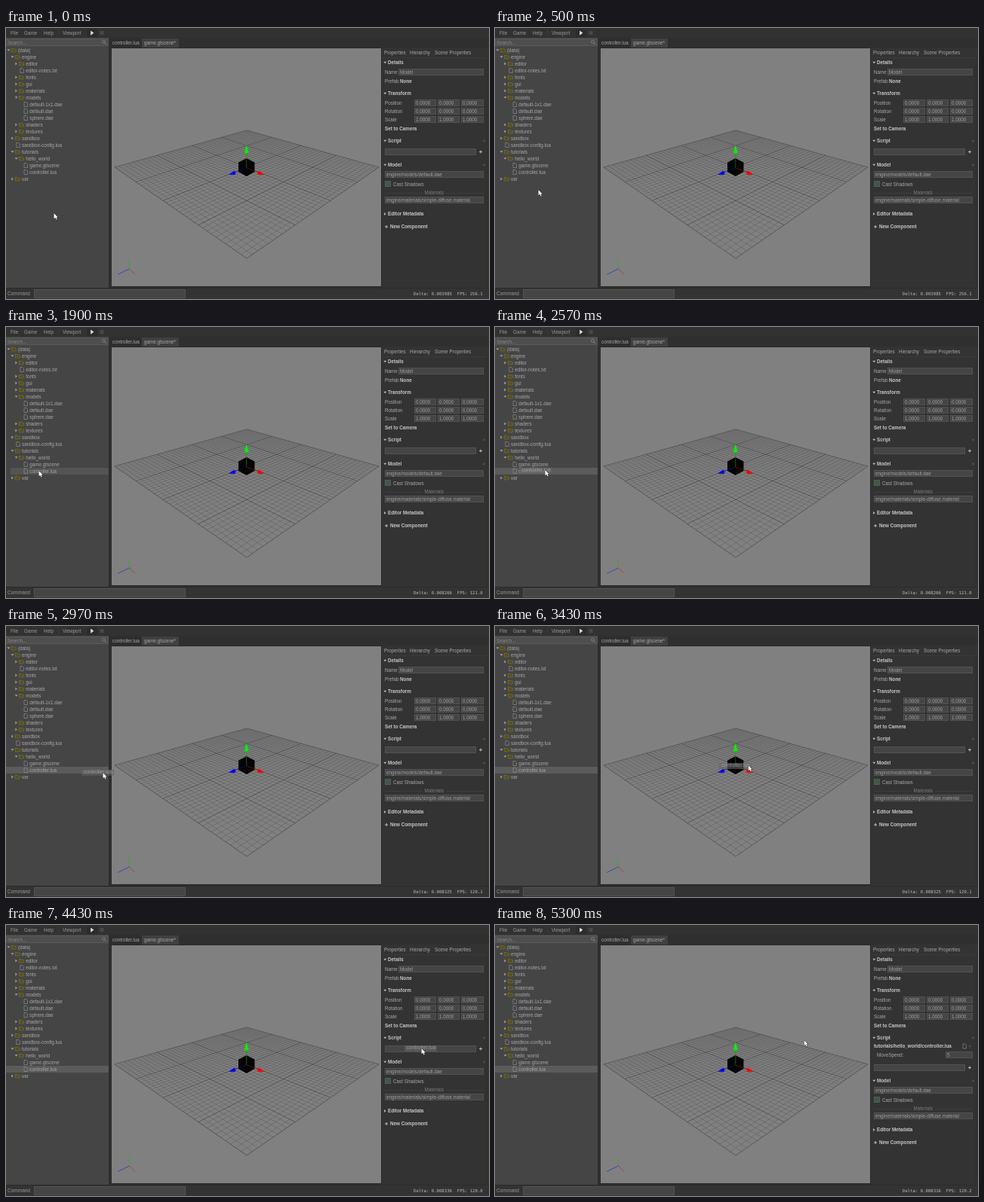
An HTML page with a canvas for the animation above (5.5 s loop, 640 by 360 pixels).

```html
<!DOCTYPE html>
<html lang="en">
<head>
<meta charset="utf-8">
<title>Scene editor</title>
<style>
html, body { margin: 0; width: 100%; height: 100%; overflow: hidden; background: #333; }
canvas { display: block; width: 640px; height: 360px; }
</style>
</head>
<body>
<canvas id="stage" width="640" height="360"></canvas>
<script>
const ctx = document.getElementById('stage').getContext('2d');
const LOOP = 5500, STEP = 200 / 3;
const SANS = '"Liberation Sans", Arial, sans-serif';
const MONO = '"DejaVu Sans Mono", monospace';
const PRESS = 2230, DRAG = 2560, DROP = 4695;
const PLAIN = '#a8a8a8', BOLD = '#c8c8c8';

// time, x, y of the pointer tip
const PATH = [
  [0, 63, 246], [133, 63, 246], [300, 62, 240], [500, 57, 215], [700, 53, 200],
  [967, 50, 192], [1100, 50, 191], [1333, 50, 191], [1433, 47, 190], [1567, 43, 191],
  [2500, 43, 191], [2567, 66, 190], [2767, 93, 193], [2967, 128, 195], [3100, 171, 195],
  [3433, 335, 185], [3700, 452, 177], [3900, 503, 171], [4100, 532, 167], [4300, 546, 164],
  [4400, 550, 164], [5033, 550, 164], [5100, 522, 162], [5167, 472, 158],
  [5233, 425, 154], [5300, 409, 153]
];

const STATS = [
  [0, '0.003985', '256.1'], [897, '0.008587', '116.5'], [1897, '0.008266', '121.0'],
  [2897, '0.008325', '120.1'], [3897, '0.008336', '120.0'], [4964, '0.008316', '120.2']
];

// level, kind (o = open, c = closed, f = file), label
const TREE = [
  [0, 'o', '(data)'], [1, 'o', 'engine'], [2, 'c', 'editor'], [2, 'f', 'editor-notes.txt'],
  [2, 'c', 'fonts'], [2, 'c', 'gui'], [2, 'c', 'materials'], [2, 'o', 'models'],
  [3, 'f', 'default-1x1.dae'], [3, 'f', 'default.dae'], [3, 'f', 'sphere.dae'],
  [2, 'c', 'shaders'], [2, 'c', 'textures'], [1, 'c', 'sandbox'], [1, 'f', 'sandbox-config.lua'],
  [1, 'o', 'tutorials'], [2, 'o', 'hello_world'], [3, 'f', 'game.gtscene'],
  [3, 'f', 'controller.lua'], [1, 'c', 'var']
];
const SCRIPT_ROW = 18;

function pathAt(t) {
  let i = 1;
  while (i < PATH.length - 1 && PATH[i][0] < t) i++;
  const [t0, x0, y0] = PATH[i - 1], [t1, x1, y1] = PATH[i];
  const p = Math.min(1, Math.max(0, (t - t0) / (t1 - t0)));
  return [x0 + (x1 - x0) * p, y0 + (y1 - y0) * p];
}

function rect(x, y, w, h, color) {
  ctx.fillStyle = color;
  ctx.fillRect(x, y, w, h);
}

function frame(x, y, w, h, color) {
  ctx.strokeStyle = color;
  ctx.lineWidth = 1;
  ctx.strokeRect(x + .5, y + .5, w - 1, h - 1);
}

function text(str, x, mid, color = PLAIN, bold = false, size = 6.3) {
  ctx.font = (bold ? 'bold ' : '') + size + 'px ' + SANS;
  ctx.fillStyle = color;
  ctx.fillText(str, x, mid + 2.3);
}

function heading(str, x, mid) {
  text(str, x, mid, BOLD, true);
}

function line(x0, y0, x1, y1, color, width = 1) {
  ctx.strokeStyle = color;
  ctx.lineWidth = width;
  ctx.beginPath();
  ctx.moveTo(x0, y0);
  ctx.lineTo(x1, y1);
  ctx.stroke();
}

function poly(pts, fill, stroke, width = .6) {
  ctx.beginPath();
  for (let i = 0; i < pts.length; i += 2) ctx.lineTo(pts[i], pts[i + 1]);
  ctx.closePath();
  if (stroke) {
    ctx.strokeStyle = stroke;
    ctx.lineWidth = width;
    ctx.stroke();
  }
  if (fill) {
    ctx.fillStyle = fill;
    ctx.fill();
  }
}

function arrow(x, y, open, color = '#b8b8b8') {
  if (open) poly([x - 2, y - 1.2, x + 2, y - 1.2, x, y + 1.3], color);
  else poly([x - 1.2, y - 2, x + 1.3, y, x - 1.2, y + 2], color);
}

function plus(x, y) {
  line(x - 2, y, x + 2, y, '#bbb');
  line(x, y - 2, x, y + 2, '#bbb');
}

function cross(x, y) {
  line(x - 1.3, y - 1.3, x + 1.3, y + 1.3, '#6c6c6c', .7);
  line(x + 1.3, y - 1.3, x - 1.3, y + 1.3, '#6c6c6c', .7);
}

function field(x, y, w, label = '') {
  rect(x, y, w, 9, '#454545');
  frame(x, y, w, 9, '#525252');
  if (label) text(label, x + 2, y + 4.5, '#a0a0a0');
}

function fileIcon(x, y) {
  poly([x, y - 3, x + 3, y - 3, x + 4.5, y - 1.5, x + 4.5, y + 3, x, y + 3], null, '#989898', .6);
}

function folderIcon(x, y) {
  poly([x, y - 2, x + 2.4, y - 2, x + 3, y - 1.2, x + 5.6, y - 1.2, x + 5.6, y + 2.2, x, y + 2.2],
    '#55501f', '#a39318', .8);
}

function topBar() {
  rect(0, 0, 640, 13, '#323232');
  text('File', 6, 6.8, '#989898');
  text('Game', 24, 6.8, '#989898');
  text('Help', 50, 6.8, '#989898');
  text('Viewport', 75, 6.8, '#989898');
  line(69.5, 2, 69.5, 11, '#3a3a3a');
  rect(107, 1, 14, 11, '#2c2c2c');
  poly([112.2, 3.4, 116.4, 6.6, 112.2, 9.8], '#e0e0e0');
  rect(124.5, 4, 5, 5, '#484848');
}

function treePanel(t, pointer) {
  rect(0, 13, 136, 333, '#454545');
  rect(0, 14, 136, 10, '#4e4e4e');
  frame(0, 14, 136, 10, '#5a5a5a');
  text('Search...', 2, 19.2, '#8a8a8a');
  ctx.strokeStyle = '#888';
  ctx.lineWidth = .8;
  ctx.beginPath();
  ctx.arc(129.5, 18.3, 2, 0, 7);
  ctx.stroke();
  line(131, 19.8, 133, 22, '#888', .9);

  const [px, py] = pointer;
  const hover = px < 136 && t < DRAG ? Math.floor((py - 25) / 9) : -1;
  TREE.forEach(([level, kind, label], i) => {
    const y = 29.5 + 9 * i, x = 16 + 5.1 * level;
    if (i === SCRIPT_ROW && t >= PRESS) rect(0, y - 4.5, 136, 9, '#5b5b5b');
    else if (i === hover) rect(6, y - 4.5, 130, 9, '#545454');
    if (kind === 'f') fileIcon(x - 7.3, y);
    else {
      arrow(x - 12.6, y, kind === 'o', '#a0a0a0');
      folderIcon(x - 8.7, y);
    }
    text(label, x, y);
  });
  line(136.5, 13, 136.5, 346, '#2b2b2b');
}

// grid plane point, both coordinates from -1 to 1
function ground(a, b) {
  const u = (a - b) / 2, v = (a + b) / 2, w = 1 - .4235 * v;
  return [319 + 175 * u / w, 185 + 69.8 * v / w];
}

function viewport() {
  rect(139, 14, 41, 12, '#2e2e2e');
  rect(180, 14, 49, 12, '#404040');
  text('controller.lua', 141, 19.5);
  text('game.gtscene*', 183, 19.5);
  rect(139, 26, 359, 318, '#2b2b2b');
  rect(140, 27, 357, 316, '#808080');

  for (let i = -20; i <= 20; i++) {
    const c = i / 20;
    const color = i % 10 ? 'rgba(40,40,40,.32)' : 'rgba(30,30,30,.7)';
    line(...ground(c, -1), ...ground(c, 1), color, .6);
    line(...ground(-1, c), ...ground(1, c), color, .6);
  }

  poly([308, 178.5, 318.7, 173, 329.4, 178.5, 329.4, 191, 318.7, 197, 308, 191], '#030303');
  line(318.7, 186, 318.7, 166, '#0a980a', .6);
  line(318.7, 186, 303, 191.7, '#0808a0', .6);
  line(318.7, 186, 334, 191.7, '#a00808', .6);
  poly([318.7, 155.3, 321.6, 165.5, 318.7, 167, 315.8, 165.5], '#00f000');
  poly([295, 194.7, 302, 189.8, 304.6, 192, 303.4, 195], '#0000f4');
  poly([342.5, 194.7, 335.4, 189.8, 333, 192, 334, 195], '#f40000');

  line(163.5, 320, 162.7, 308.5, '#28b028', .8);
  line(163.5, 320, 148, 327.5, '#2838b8', .8);
  line(163.5, 320, 171, 327.5, '#b83030', .8);
}

function section(label, y, open = true) {
  arrow(502.3, y, open);
  heading(label, 506, y);
}

function properties(attached) {
  rect(498, 26, 142, 320, '#333');
  text('Properties', 501, 33);
  text('Hierarchy', 535, 33);
  text('Scene Properties', 568, 33);
  line(498, 39.5, 637, 39.5, '#3b3b3b');
  line(637.5, 39, 637.5, 344, '#2d2d2d');

  section('Details', 46);
  text('Name', 502, 58.5);
  field(520, 54, 113, 'Model');
  text('Prefab', 502, 71);
  heading('None', 522, 71);

  section('Transform', 87);
  ['Position', 'Rotation', 'Scale'].forEach((label, row) => {
    const y = 99.5 + 11 * row;
    text(label, 502, y);
    for (let i = 0; i < 3; i++) field(541 + 31 * i, y - 4.5, 29 + (i === 2), row === 2 ? '1.0000' : '0.0000');
  });
  heading('Set to Camera', 502, 134);

  section('Script', 150);
  cross(633.5, 150);
  if (attached) {
    heading('tutorials/hello_world/controller.lua', 502, 161);
    fileIcon(620, 161);
    cross(629.5, 161);
    text('MoveSpeed:', 506, 172.5);
    field(597, 168, 36, '5');
  }
  const d = attached ? 25 : 0;
  field(502, 160 + d, 121);
  plus(629, 164.5 + d);

  section('Model', 182 + d);
  cross(633.5, 182 + d);
  field(502, 190 + d, 131, 'engine/models/default.dae');
  rect(502, 203 + d, 8, 8, '#455548');
  frame(502, 203 + d, 8, 8, '#4f5f52');
  text('Cast Shadows', 513, 207.5 + d);
  line(502, 219.5 + d, 552, 219.5 + d, '#3e3e3e');
  line(583, 219.5 + d, 633, 219.5 + d, '#3e3e3e');
  text('Materials', 554.5, 219 + d, '#7c7c7c');
  field(502, 224 + d, 131, 'engine/materials/simple-diffuse.material');

  section('Editor Metadata', 247 + d, false);
  plus(504.1, 264 + d);
  heading('New Component', 509, 264 + d);
}

function statusBar(t) {
  rect(0, 346, 640, 14, '#333');
  line(0, 345.5, 640, 345.5, '#2b2b2b');
  text('Command', 2, 352.5, '#989898', false, 6.5);
  rect(37, 347, 201, 12, '#454545');
  frame(37, 347, 201, 12, '#525252');
  const [, delta, fps] = STATS.filter(s => s[0] <= t).pop();
  ctx.font = '5.65px ' + MONO;
  ctx.fillStyle = '#bcbcbc';
  ctx.fillText(`Delta: ${delta}  FPS: ${fps}`, 540, 355);
}

function dragLabel(x, y) {
  ctx.globalAlpha = .6;
  rect(x - 22, y - 4, 43, 8, '#646464');
  text('controller.lua', x - 19.3, y - 1, '#c4c4c4', false, 6.8);
  ctx.globalAlpha = 1;
}

function cursor(x, y) {
  const shape = [0, 0, 0, 7.4, 1.8, 5.8, 3, 8.5, 4.3, 7.9, 3.1, 5.4, 5.4, 5.4];
  poly(shape.map((v, i) => v + (i % 2 ? y : x + .5)), '#fff', '#111', 1);
}

function draw(now) {
  const raw = now % LOOP;
  // the screen refreshes fifteen times a second
  const t = Math.max(0, STEP / 2 + STEP * Math.floor((raw + 4 - STEP / 2) / STEP));
  const pointer = pathAt(t);
  rect(0, 0, 640, 360, '#2f2f2f');
  topBar();
  treePanel(t, pointer);
  viewport();
  properties(t >= DROP);
  statusBar(t);
  if (t >= DRAG && t < DROP) dragLabel(...pathAt(t - STEP / 2));
  cursor(...pointer);
}

const start = performance.now();
function tick() {
  draw(performance.now() - start);
  requestAnimationFrame(tick);
}
tick();
</script>
</body>
</html>
```
